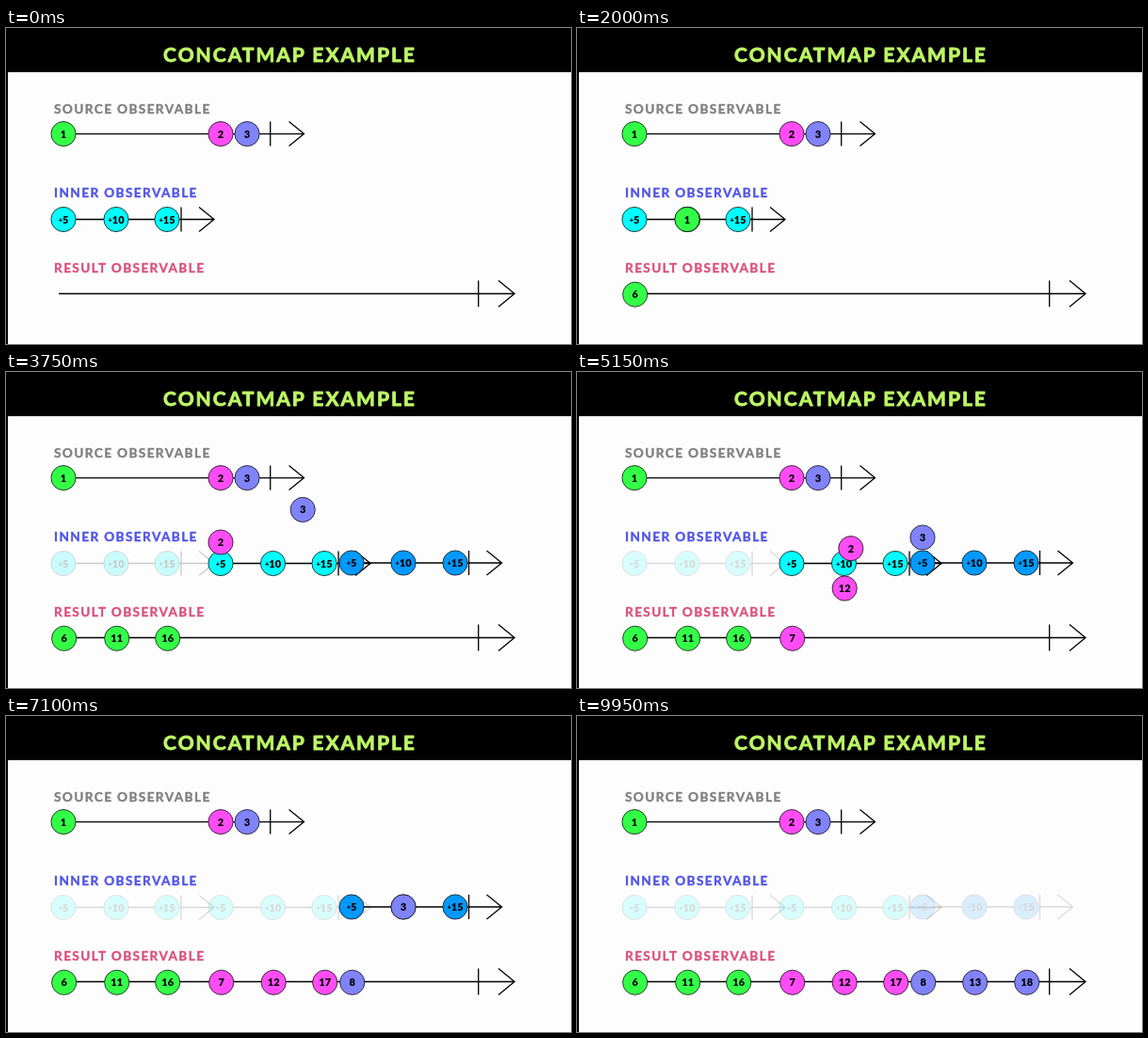
Recreate the animation shown at these times as an HTML page. Size 600 by 336 pixels, loop 10 s.

```html
<!DOCTYPE html>
<html lang="en">
<head>
<meta charset="utf-8">
<title>concatMap example</title>
<style>
  html, body { margin: 0; width: 100%; height: 100%; overflow: hidden; background: #fdfdfd; }
  svg { display: block; width: 600px; height: 336px; }
  text { font-family: Lato, sans-serif; font-weight: 900; }
  .title, .label { font-weight: 700; stroke-linejoin: round; }
  .title { font-size: 21px; letter-spacing: 2px; fill: #bdf565; stroke: #bdf565; stroke-width: .9; text-anchor: middle; }
  .label { font-size: 13.6px; letter-spacing: 1.4px; stroke-width: .4; }
  .num { font-size: 11px; text-anchor: middle; fill: #000; }
  .plus { font-size: 7.5px; }
  .line { fill: none; stroke: #000; stroke-width: 1.3; }
  circle { stroke: #111; stroke-width: .8; }
</style>
</head>
<body>
<svg id="stage" viewBox="0 0 600 336">
  <rect width="600" height="336" fill="#fdfdfd"/>
  <rect width="600" height="47" fill="#000"/>
  <rect width="2" height="336" fill="#000"/>
  <text class="title" x="301.5" y="36">CONCATMAP EXAMPLE</text>
  <text class="label" x="51" y="91" fill="#7f7f7f" stroke="#7f7f7f">SOURCE OBSERVABLE</text>
  <text class="label" x="51" y="179.7" fill="#4f53e6" stroke="#4f53e6">INNER OBSERVABLE</text>
  <text class="label" x="51" y="260" fill="#d9507c" stroke="#d9507c">RESULT OBSERVABLE</text>
</svg>
<script>
const LOOP = 10000, STEP = 1022, HOP = 900, DROP = 600;
const SOURCE_Y = 112.6, INNER_Y = 203.5, RESULT_Y = 282.5;
const GREEN = '#33ff47', PINK = '#ff4cf5', VIOLET = '#8083fa', CYAN = '#00ffff', BLUE = '#0099ff';
const stage = document.getElementById('stage');

function add(parent, tag, attrs, text) {
  const el = document.createElementNS('http://www.w3.org/2000/svg', tag);
  for (const key in attrs) el.setAttribute(key, attrs[key]);
  if (text !== undefined) el.textContent = text;
  parent.append(el);
  return el;
}

function axis(parent, from, bar, tip, y, head = 16, half = 13) {
  add(parent, 'path', { class: 'line',
    d: `M${from} ${y}H${tip}M${bar} ${y - half}v${2 * half}M${tip - head} ${y - half}L${tip} ${y}L${tip - head} ${y + half}` });
}

function ball(parent, x, y, fill, value, plus) {
  const g = add(parent, 'g', { transform: `translate(${x} ${y})` });
  add(g, 'circle', { r: 13.1, fill });
  const label = add(g, 'text', { class: 'num', y: 4 });
  if (plus) add(label, 'tspan', { class: 'plus', dy: -1 }, '+');
  add(label, 'tspan', plus ? { dy: 1 } : {}, value);
  return g;
}

function place(el, x, y, opacity) {
  el.setAttribute('transform', `translate(${x.toFixed(2)} ${y.toFixed(2)})`);
  el.setAttribute('opacity', opacity);
}

const clamp = u => Math.min(1, Math.max(0, u));
const span = (t, start, length) => clamp((t - start) / length);
const ease = u => (1 - Math.cos(Math.PI * u)) / 2;
const mix = (a, b, u) => a + (b - a) * u;

// emit: when the first result leaves; fall: source to inner row
const runs = [
  { value: 1, x: 61, xs: [61, 117, 171], y: INNER_Y, color: GREEN, inner: CYAN, bar: 186, tip: 221,
    emit: 976, fall: [350, 580], appear: -1000 },
  { value: 2, x: 228, xs: [228, 283.5, 338], y: INNER_Y, color: PINK, inner: CYAN, bar: 353, tip: 387,
    emit: 3894, fall: [3400, 525], appear: 3000 },
  { value: 3, x: 256, xs: [367, 422, 477], y: 203, color: VIOLET, inner: BLUE, bar: 491.5, tip: 526.5,
    emit: 6178, fall: [3480, 520], wait: 176, land: [5850, 300], appear: 3000 }
];

axis(stage, 61, 280.7, 316.5, SOURCE_Y);
axis(stage, 56, 501.7, 540, RESULT_Y, 17, 14);
for (const r of runs) ball(stage, r.x, SOURCE_Y, r.color, r.value);
for (const r of runs) {
  r.group = add(stage, 'g');
  axis(r.group, r.xs[0], r.bar, r.tip, r.y);
  r.xs.forEach((x, i) => ball(r.group, x, r.y, r.inner, 5 * (i + 1), true));
}
for (const r of runs) r.results = r.xs.map((x, i) => ball(stage, x, r.y, r.color, r.value + 5 * (i + 1)));
for (const r of runs) r.mover = ball(stage, r.x, SOURCE_Y, r.color, r.value);

function position(r, t) {
  const u = ease(span(t, ...r.fall));
  let x = mix(r.x, r.xs[0], u), y = mix(SOURCE_Y, r.wait || r.y, u);
  if (r.land) y = mix(y, r.y, ease(span(t, ...r.land)));
  for (let i = 0; i < 2; i++) {
    const p = ease(span(t, r.emit + i * STEP + 20, HOP));
    x += (r.xs[i + 1] - r.xs[i]) * p;
    y -= 48 * Math.sqrt(p) * (1 - p) ** .7;
  }
  return [x, y];
}

function draw() {
  const t = performance.now() % LOOP;
  for (const r of runs) {
    const last = r.emit + 2 * STEP;
    const left = 1 - span(t, last - 150, 1200);
    r.group.setAttribute('opacity', span(t, r.appear, 300) * mix(.14, 1, left * left));
    r.results.forEach((el, i) => {
      const start = r.emit + i * STEP;
      place(el, r.xs[i] + .7, mix(r.y, RESULT_Y + .8, ease(span(t, start, DROP))), t >= start ? 1 : 0);
    });
    const shown = t >= r.fall[0] ? 1 - span(t, last + 350, 250) : 0;
    place(r.mover, ...position(r, t), shown);
  }
  requestAnimationFrame(draw);
}
draw();
</script>
</body>
</html>
```
